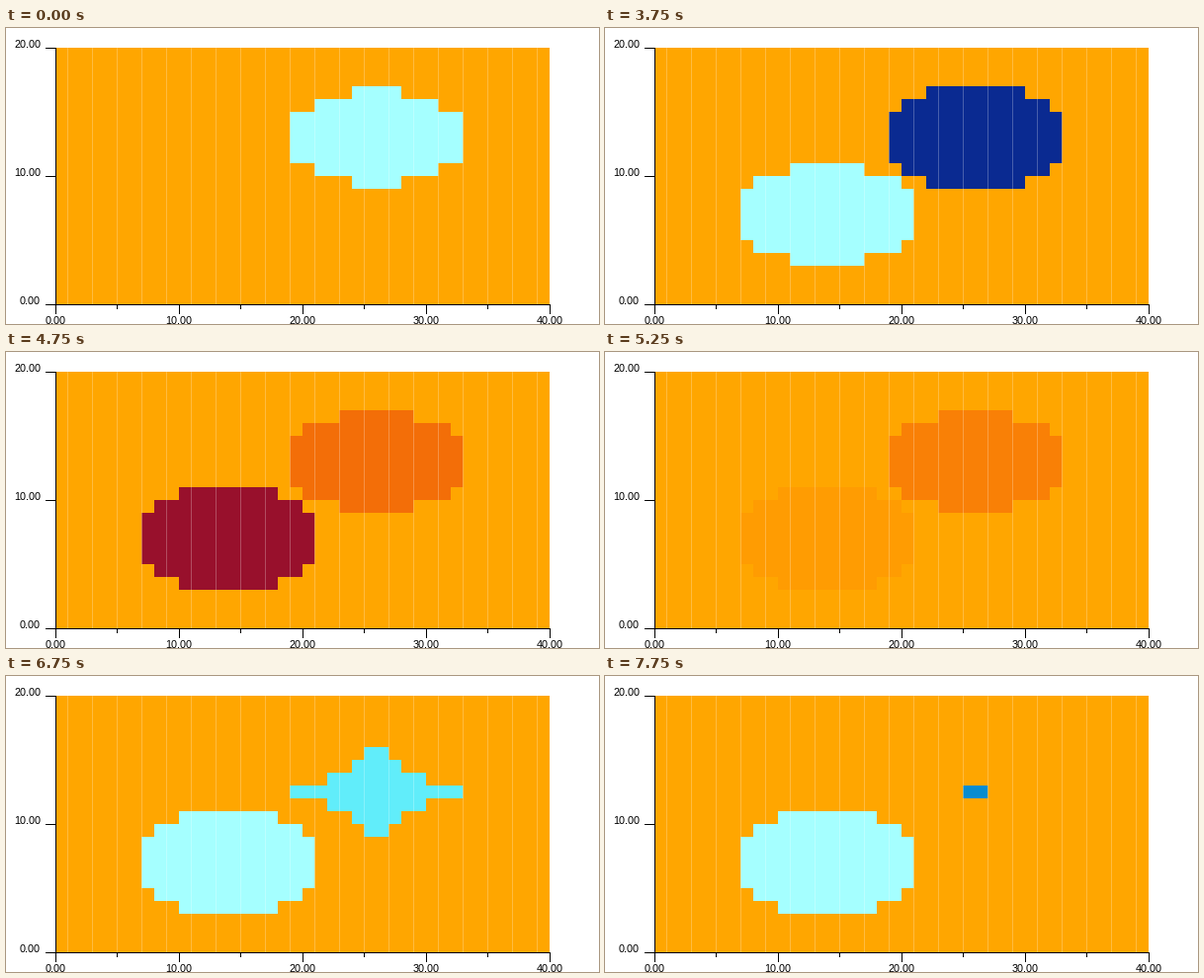
Write a matplotlib script that moves like this. It is 600 px wide and 300 px high and loops after 8 s.

```python
import matplotlib.pyplot as plt
import numpy as np
from matplotlib.animation import FuncAnimation

W, H, DPI = 600, 300, 100
COLS, ROWS = 40, 20
LEFT, TOP, RIGHT, BOTTOM = 50, 20, 550, 280
STEP, FRAMES = 250, 32
FONT_PX = 11

plt.rcParams.update({
    "font.family": "Liberation Sans",
    "text.hinting": "native",
    "text.hinting_factor": 1,
})

# Colour ramp from the lowest state to the resting one.
RAMP = np.array([
    (165, 255, 255), (97, 237, 250), (42, 186, 236), (8, 140, 208),
    (10, 42, 145), (152, 16, 44), (243, 110, 8), (255, 147, 4), (255, 166, 0),
])
REST = len(RAMP) - 1

# Cell centres in grid units, rows counted from the top.
COL, ROW = np.meshgrid(np.arange(COLS) + 0.5, np.arange(ROWS) + 0.5)
HALF_WIDTH = 7.55


def blob(cx, cy, height, power=2.0, scale=1.0):
    """Cells inside a superellipse; a power below 1 makes a pointed star."""
    dx = np.abs(COL - cx) / (HALF_WIDTH * scale)
    dy = np.abs(ROW - cy) / (height * scale)
    return dx ** power + dy ** power <= 1


def upper_blob(t):
    height = np.interp(t, [0, 250, 3500, 3750, 4000, 5750, 6750],
                       [3.64, 3.9, 3.9, 4, 3.9, 3.66, 4])
    # It sharpens into a star, then shrinks away.
    sharpen = np.interp(t, [5750, 6750], [0, 1])
    scale = np.interp(t, [6750, 7750], [1, 0.13])
    return blob(26, 7 + 0.4 * sharpen, height, 2 - 1.25 * sharpen, scale)


def lower_blob(t):
    return blob(14, 13, np.interp(t, [3750, 4000], [3.75, 4]))


def upper_state(t):
    if t < 3750:
        return 0
    return np.interp(t, [3750, 4750, 5750, 7750], [4, 6, 7, 11]) % REST


def lower_state(t):
    return np.interp(t, [3750, 5350, 6750, 7750], [0, 8, 8, 16]) % REST


def states(t):
    grid = np.full((ROWS, COLS), float(REST))
    grid[upper_blob(t)] = upper_state(t)
    if t >= 3750:
        grid[lower_blob(t)] = lower_state(t)
    return grid


def paint_cells(grid):
    index = np.arange(len(RAMP))
    rgb = np.stack([np.interp(grid, index, c) for c in RAMP.T], axis=-1)
    # Cells are 12.5 px wide: two cells share a half-covered pixel column.
    left, right = rgb[:, 0::2], rgb[:, 1::2]
    seam = 0.25 * 255 + 0.25 * left + 0.5 * right
    pair = np.stack([left] * 12 + [seam] + [right] * 12, axis=2)
    strip = pair.reshape(ROWS, RIGHT - LEFT, 3)
    return np.repeat(strip, (BOTTOM - TOP) // ROWS, axis=0).round()


def paint_axes(canvas):
    canvas[TOP:BOTTOM + 1, LEFT] = 0
    canvas[BOTTOM, LEFT:RIGHT + 1] = 0
    for y in range(TOP, BOTTOM + 1, 130):
        canvas[y, LEFT - 10:LEFT] = 0
    for i in range(9):
        length = 5 if i % 2 else 10
        canvas[BOTTOM:BOTTOM + length, int(LEFT + 62.5 * i)] = 0


def stage(t):
    canvas = np.full((H, W, 3), 255, np.uint8)
    canvas[TOP:BOTTOM, LEFT:RIGHT] = paint_cells(states(t))
    paint_axes(canvas)
    return canvas


fig = plt.figure(figsize=(W / DPI, H / DPI), dpi=DPI, facecolor="white")
ax = fig.add_axes([0, 0, 1, 1])
picture = ax.imshow(stage(0), extent=(0, W, H, 0),
                    interpolation="nearest", aspect="auto")
ax.axis("off")


def label(x, y, value, align):
    ax.text(x, y, f"{value:.2f}", fontsize=FONT_PX * 72 / DPI,
            color="black", ha=align, va="baseline")


for value in range(0, ROWS + 1, 10):
    label(LEFT - 15, BOTTOM - 13 * value, value, "right")
for value in range(0, COLS + 1, 10):
    label(LEFT + 12.5 * value, H, value, "center")


def update(frame):
    picture.set_data(stage(frame * STEP))
    return [picture]


anim = FuncAnimation(fig, update, frames=FRAMES, interval=STEP,
                     repeat=True, repeat_delay=0, blit=False)
plt.show()
```
